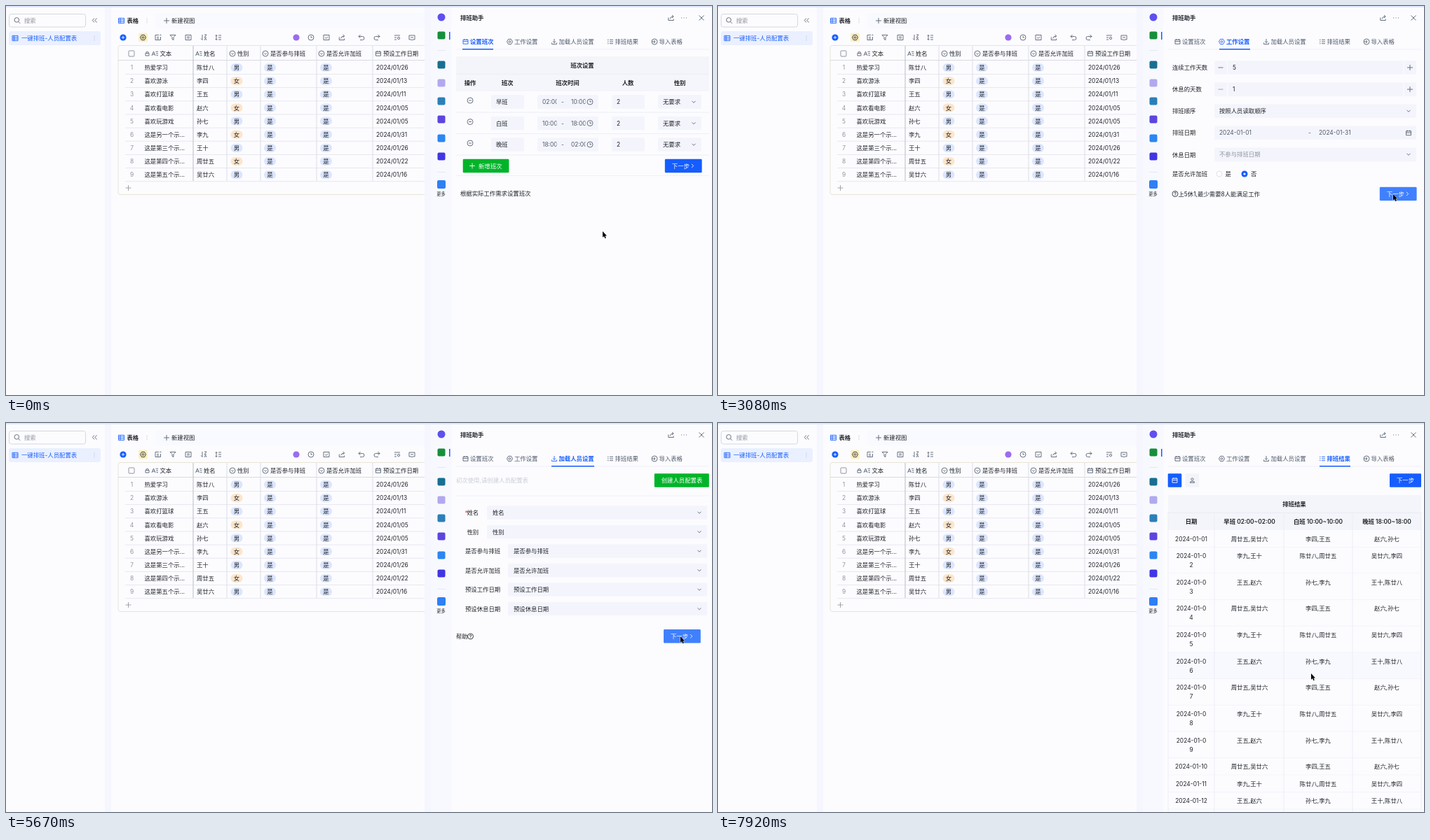
Recreate the animation shown at these times as an HTML page. Size 1007 px wide and 556 px high, loop 8 s.

```html
<!DOCTYPE html>
<html lang="zh-CN">
<head>
<meta charset="utf-8">
<title>排班助手</title>
<style>
html, body { margin: 0; width: 100%; height: 100%; overflow: hidden; background: #f5f6fe; }
svg { display: block; }
text { font: 8.4px Inter, "Noto Sans CJK SC", "Noto Sans CJK", sans-serif; fill: currentColor; white-space: pre; }
.b { font-weight: 600; }
.m { text-anchor: middle; }
.i { fill: none; stroke: currentColor; stroke-width: .85; }
#stage { color: #1f2329; }
#stage .w { color: #fff; }
.g { color: #4e5969; }
.l { color: #8f959e; }
.k { color: #165dff; }

/* one percent of the loop is 80 ms */
.page, .tab, .btn, .anim { animation: 8s step-end infinite; }
.page1 { animation-name: page1; }
.page2 { animation-name: page2; }
.page3 { animation-name: page3; }
.page4 { animation-name: page4; }
@keyframes page1 { 0% { visibility: visible } 17.7%, 100% { visibility: hidden } }
@keyframes page2 { 0% { visibility: hidden } 17.7% { visibility: visible } 49.95%, 100% { visibility: hidden } }
@keyframes page3 { 0% { visibility: hidden } 49.95% { visibility: visible } 83.3%, 100% { visibility: hidden } }
@keyframes page4 { 0% { visibility: hidden } 83.3%, 100% { visibility: visible } }

.tab { color: #4e5969; }
.tab1 { animation-name: tab1; }
.tab2 { animation-name: tab2; }
.tab3 { animation-name: tab3; }
.tab4 { animation-name: tab4; }
.tab text { font-weight: inherit; }
@keyframes tab1 { 0% { color: #165dff; font-weight: 600 } 17.7% { color: #165dff; font-weight: 400 } 18.7%, 100% { color: #4e5969; font-weight: 400 } }
@keyframes tab2 { 0% { color: #4e5969; font-weight: 400 } 17.7% { color: #1f2329; font-weight: 600 } 18.7% { color: #165dff; font-weight: 600 }
  49.95% { color: #165dff; font-weight: 400 } 50.95%, 100% { color: #4e5969; font-weight: 400 } }
@keyframes tab3 { 0% { color: #4e5969; font-weight: 400 } 49.95% { color: #1f2329; font-weight: 600 } 50.95% { color: #165dff; font-weight: 600 }
  83.3% { color: #165dff; font-weight: 400 } 84.3%, 100% { color: #4e5969; font-weight: 400 } }
@keyframes tab4 { 0% { color: #4e5969; font-weight: 400 } 83.3% { color: #1f2329; font-weight: 600 } 84.3%, 100% { color: #165dff; font-weight: 600 } }

.bar { animation-name: bar; }
@keyframes bar {
  0% { x: 651px; width: 44px } 17.7% { x: 678px; width: 44px } 18.7% { x: 710px; width: 44px } 19.7% { x: 715px; width: 44px }
  49.95% { x: 741px; width: 52px } 50.95% { x: 774px; width: 60px } 52.05% { x: 778px; width: 61px }
  83.3% { x: 812px; width: 54px } 84.3% { x: 852px; width: 46px } 85.3%, 100% { x: 858px; width: 44px }
}

.btn1 { animation-name: btn1; }
.btn2 { animation-name: btn2; }
.btn3 { animation-name: btn3; }
@keyframes btn1 { 0% { fill: #165dff } 12.45% { fill: #4080ff } 15.55%, 100% { fill: #0e42d2 } }
@keyframes btn2 { 0% { fill: #165dff } 30.2% { fill: #4080ff } 47.8%, 100% { fill: #0e42d2 } }
@keyframes btn3 { 0% { fill: #165dff } 60.3% { fill: #4080ff } 68.7% { fill: #0e42d2 } 70.8% { fill: #4080ff } 72.8%, 100% { fill: #165dff } }

.fade { animation-name: fade; }
.drop { animation-name: drop; }
.busy { animation-name: busy; }
.hot { animation-name: hot; }
.clear { animation-name: clear; }
.open { animation-name: open; }
.row5 { animation-name: row5; }
.row6 { animation-name: row6; }
@keyframes fade { 0% { opacity: 1 } 72.8%, 100% { opacity: .42 } }
@keyframes drop { 0% { transform: none } 72.8%, 100% { transform: translateY(13px) } }
@keyframes busy { 0% { opacity: 0 } 72.8%, 100% { opacity: 1 } }
@keyframes hot { 0% { fill: #eff0f8 } 58.3%, 100% { fill: #f4f5fc } }
@keyframes clear { 0% { opacity: 1 } 58.3%, 100% { opacity: 0 } }
@keyframes open { 0% { opacity: 0 } 58.3%, 100% { opacity: 1 } }
@keyframes row5 { 0% { fill: #fcfcff } 87.4% { fill: #f8f9fe } 96.8%, 100% { fill: #fcfcff } }
@keyframes row6 { 0% { fill: #fcfcff } 96.8%, 100% { fill: #f8f9fe } }

.spin { animation: spin 1s steps(12) infinite; }
@keyframes spin { from { transform: rotate(120deg) } to { transform: rotate(480deg) } }

.cursor { animation-name: cursor; }
@keyframes cursor {
  0% { transform: translate(851px, 322px) }
  3.1% { transform: translate(849px, 322px) }
  6.2% { transform: translate(849px, 322px); animation-timing-function: steps(4, start) }
  10.4% { transform: translate(1001px, 216px) }
  11.45% { transform: translate(1001px, 216px); animation-timing-function: steps(4, start) }
  15.6% { transform: translate(962px, 227px) }
  23.95% { transform: translate(962px, 227px); animation-timing-function: steps(3, start) }
  27.05% { transform: translate(907px, 240px); animation-timing-function: steps(1, start) }
  28.1% { transform: translate(904px, 243px); animation-timing-function: steps(4, start) }
  32.2% { transform: translate(962px, 270px) }
  37.45% { transform: translate(963px, 270px) }
  38.45% { transform: translate(963px, 269px) }
  56.2% { transform: translate(963px, 269px); animation-timing-function: steps(6, start) }
  62.5% { transform: translate(946px, 302px); animation-timing-function: steps(4, start) }
  66.6% { transform: translate(958px, 303px); animation-timing-function: steps(3, start) }
  69.7% { transform: translate(962px, 305px) }
  72.85% { transform: translate(962px, 305px); animation-timing-function: steps(8, start) }
  81.2% { transform: translate(904px, 296px); animation-timing-function: steps(11, start) }
  92.6% { transform: translate(850px, 318px) }
  96.8% { transform: translate(850px, 318px); animation-timing-function: steps(3, start) }
  99.95%, 100% { transform: translate(846px, 358px) }
}
</style>
</head>
<body>
<svg id="stage" width="1007" height="556" viewBox="0 0 1007 556"></svg>
<script>
const BLUE = '#165dff', GREEN = '#00b42a', FIELD = '#f4f5fc', LINE = '#e6e8f0', PANEL = '#fcfcff';
const CONTROL = 19.6;
const CIRCLE = 'M-4 0a4 4 0 1 0 8 0a4 4 0 1 0-8 0';
const ICON = {
  plus: 'M-4 0H4M0-4V4', minus: 'M-3.5 0H3.5', cross: 'M-3.5-3.5 3.5 3.5M3.5-3.5-3.5 3.5',
  smallCross: 'M-2-2 2 2M2-2-2 2', down: 'M-2.5-1.2 0 1.3 2.5-1.2', right: 'M-1.3-2.6 1.3 0-1.3 2.6',
  remove: CIRCLE + 'M-2 0H2', clock: CIRCLE + 'M0-2.2V0H2', select: CIRCLE + 'M-1.8-.7 0 1.2 1.8-.7',
  help: CIRCLE + 'M-1.3-1Q-1-2.3 0-2.3 1.4-2.2 1.3-1 1 0 0 .2V1M0 1.8V2.5', into: CIRCLE + 'M-4 0H1M-1-2 1 0-1 2',
  gear: 'M-2-3.6H2L4 0 2 3.6H-2L-4 0ZM-1.4 0a1.4 1.4 0 1 0 2.8 0a1.4 1.4 0 1 0-2.8 0',
  calendar: 'M-3.5-2.8H3.5V3.2H-3.5ZM-3.5-.4H3.5M-1.7-4V-2M1.7-4V-2', load: 'M0-4V1.5M-2-.5 0 1.5 2-.5M-3.5 1.5V3.5H3.5V1.5',
  list: 'M-4-2.7H-2.5M-4 0H-2.5M-4 2.7H-2.5M-1-2.7H4M-1 0H4M-1 2.7H4', grid: 'M-4-3.6H4V3.6H-4ZM-4-1.2H4M-4 1.2H4M-1.5-3.6V3.6',
  share: 'M-3.7-.5V3.5H3.7V1.5M-1.5 1.5Q-1-2 3.5-2M1.5-4 3.7-2 1.5 0', dots: 'M-4 0H-3M-.5 0H.5M3 0H4', more: 'M0-3.2V-2.4M0-.4V.4M0 2.4V3.2',
  search: 'M-4-.6a3.3 3.3 0 1 0 6.6 0a3.3 3.3 0 1 0-6.6 0M1.7 1.9 4.2 4.4', fold: 'M-.5-3-3.2 0-.5 3M3-3 .3 0 3 3',
  lock: 'M-2.5-.5H2.5V3H-2.5ZM-1.5-.5V-2Q0-4 1.5-2V-.5', alpha: 'M-4.5 3-2-3 .5 3M-3.7 1H-.3M1-2.7H4.5M1.5 0H4.5M2 2.7H4.5',
  person: 'M-1.6-1.6a1.6 1.6 0 1 0 3.2 0a1.6 1.6 0 1 0-3.2 0M-3 3.3V2Q0 .5 3 2V3.3Z',
  form: 'M3.5-1V3.5H-4V-3.5H1M-2-.5H1M-2 1.7H1M2.3-3.5H4.5', filter: 'M-4-3.5H4L1-.3V3.5L-1 2.5V-.3Z',
  box: 'M-4-3.5H4V3.5H-4ZM-2-1H2M-2 1H2', sort: 'M-2-4V3.5L-4 1.5M1-4H4L1 0H4M1 4 2.5 1 4 4',
  height: 'M-3-3.5V3.5M-4.3-2-3-3.5-1.7-2M-4.3 2-3 3.5-1.7 2M0-3H4M0 0H4M0 3H4',
  undo: 'M-1.5-4-4-1.5-1.5 1M-4-1.5H1.5Q4-1.5 4 1 4 3.5 1.5 3.5H-2', redo: 'M1.5-4 4-1.5 1.5 1M4-1.5H-1.5Q-4-1.5-4 1-4 3.5-1.5 3.5H2',
  find: 'M-4-3H4M-4 0H-1M-4 3H-1M.5 1a1.6 1.6 0 1 0 3.2 0a1.6 1.6 0 1 0-3.2 0', check: 'M-4-3.5H4V3.5H-4ZM-2 0-.5 1.5 2-1.2',
  note: 'M-4-3H4V3H1L0 4-1 3H-4ZM-2 0H2'
};

const text = (x, y, s, cls = '') => `<text x="${x}" y="${y + 3.1}" class="${cls}">${s}</text>`;
const rect = (x, y, w, h, fill, r = 0, extra = '') =>
  `<rect x="${x}" y="${y}" width="${w}" height="${h}" fill="${fill}" rx="${r}" ${extra}/>`;
const icon = (x, y, name, cls = '') => `<path d="${ICON[name]}" transform="translate(${x} ${y})" class="i ${cls}"/>`;
const disc = (x, y, r, fill) => `<circle cx="${x}" cy="${y}" r="${r}" fill="${fill}"/>`;
const hline = (x, y, w, c = LINE) => rect(x, y, w, 1, c);
const vline = (x, y, h, c = LINE) => rect(x, y, 1, h, c);
const group = (cls, s) => `<g class="${cls}">${s}</g>`;
const map = (list, fn) => list.map(fn).join('');
const control = (x, y, w, fill, extra = '') => rect(x, y - CONTROL / 2, w, CONTROL, fill, 1.4, extra);
const nextButton = (x, y, cls) =>
  control(x, y, 52.8, BLUE, `class="btn ${cls}"`) + text(x + 10, y, '下一步', 'w') + icon(x + 39.5, y, 'right', 'w');

function sidebar() {
  return rect(0, 2, 141, 554, PANEL) + rect(4.5, 11.5, 109, 18.5, PANEL, 3, 'stroke="#d5d8e2"') +
    icon(16, 20.5, 'search', 'g') + text(26, 21, '搜索', 'l') + icon(126.5, 20.5, 'fold', 'g') +
    rect(4, 36, 131, 20, '#eaf0ff', 3) + icon(13, 46, 'grid', 'k') + text(22, 46, '一键排班-人员配置表', 'k') + icon(126, 46, 'more', 'l');
}

function table() {
  const people = ['陈廿八', '李四', '王五', '赵六', '孙七', '李九', '王十', '周廿五', '吴廿六'];
  const notes = ['热爱学习', '喜欢游泳', '喜欢打篮球', '喜欢看电影', '喜欢玩游戏', '这是另一个示...', '这是第三个示...', '这是第四个示...', '这是第五个示...'];
  const days = [26, 13, 11, '05', '05', 31, 26, 22, 16];
  const women = [1, 3, 5, 7];
  const tools = [[217, 'form'], [238, 'filter'], [260, 'box'], [282, 'sort'], [303, 'height'], [435, 'clock'], [457, 'check'],
    [479, 'share'], [507, 'undo'], [529, 'redo'], [558, 'find'], [579, 'note']];
  const heads = [[370, '是否参与排班'], [450, '是否允许加班'], [323, '性别']];
  const pill = (x, y, s, fill) => rect(x - 8.5, y - 6, 17, 12, fill, 6) + text(x, y, s, 'm');
  const row = (name, i) => {
    const y = 88 + i * 19.15;
    return text(179.5, y, i + 1, 'm l') + text(197.5, y, notes[i]) + text(272, y, name) +
      (women.includes(i) ? pill(329, y, '女', '#fde5cb') : pill(329, y, '男', '#dce6fd')) +
      pill(376.5, y, '是', '#dce6fd') + pill(456.5, y, '是', '#dce6fd') +
      text(528, y, '2024/01/' + days[i]) + hline(170, y + 9, 427);
  };
  return rect(150, 2, 447, 554, PANEL) + rect(213, 10, 384, 22, '#f9faff') +
    icon(164.5, 21, 'grid', 'k') + text(172.5, 21, '表格', 'b') + icon(201, 21, 'more', 'l') +
    icon(229, 21, 'plus', 'g') + text(236, 21, '新建视图') +
    disc(167, 45, 4.6, BLUE) + '<path d="M164.8 45h4.4M167 42.8v4.4" class="i w"/>' +
    rect(189, 38.5, 13, 13, '#fdf0c4', 2) + icon(195.5, 45, 'gear') + disc(414, 45, 4.6, '#9b6cf0') +
    map(tools, ([x, name]) => icon(x, 45, name, 'g')) +
    '<path d="M597 56.5H163q-3 0-3 3V266q0 3.5 3 3.5H597" fill="none" stroke="#e8e5d6"/>' +
    hline(160, 77, 437, '#d9dbe2') + rect(175, 64, 8, 8, 'none', 1, 'stroke="#8f959e"') +
    icon(201.5, 68, 'lock', 'g') + icon(212.5, 68, 'alpha', 'g') + text(219.5, 68, '文本') +
    icon(275, 68, 'alpha', 'g') + text(282, 68, '姓名') +
    map(heads, ([x, s]) => icon(x, 68, 'select', 'g') + text(x + 7, 68, s)) +
    icon(531, 68, 'calendar', 'g') + text(538, 68, '预设工作日期') + map(people, row) +
    vline(266.5, 57, 193, '#b9bcc6') + map([315, 363, 443, 523], x => vline(x - .5, 57, 193, '#dcdee6')) + icon(174.5, 260, 'plus', 'l');
}

function dock() {
  const squares = [[42, '#168f3c'], [84, '#186f92'], [110, '#b1a9ef'], [136, '#2b7fb8'], [162, '#5b45e0'], [189, '#2b86f3'], [215, '#4036e4']];
  return rect(606, 2, 29, 554, '#f8f9ff') + disc(621, 16, 5.5, '#5f4ff0') +
    map(squares, ([y, c]) => rect(615.5, y - 5.5, 11, 11, c, 2)) + rect(615, 249, 12, 12, '#2f7ff5', 2) +
    hline(615, 63, 12) + hline(615, 237, 12) + rect(632, 37, 1.5, 11, BLUE) +
    '<text x="620.5" y="271" class="m" style="font-size:6.3px">更多</text>';
}

function panelHead() {
  const tabs = [[655.5, 'calendar', '设置班次'], [718.5, 'gear', '工作设置'], [782, 'load', '加载人员设置'], [862, 'list', '排班结果'], [925, 'into', '导入表格']];
  return rect(635, 2, 372, 554, PANEL) + text(648, 17, '排班助手', 'b') +
    icon(948.5, 17, 'share', 'g') + icon(967, 17, 'dots', 'g') + icon(992, 17, 'cross', 'g') + hline(642, 61.5, 361, '#f1f2f8') +
    map(tabs, ([x, name, s], i) => group(`tab tab${i + 1}`, icon(x, 51, name) + text(x + 6.5, 51, s))) +
    rect(651, 61, 44, 1.5, BLUE, 0, 'class="anim bar"');
}

function shiftPage() {
  const heads = [[662, '操作'], [715, '班次'], [801, '班次时间'], [887, '人数'], [961, '性别']];
  const shifts = [['早班', '02:00', '10:00'], ['白班', '10:00', '18:00'], ['晚班', '18:00', '02:00']];
  const time = (x, y, s) => `<svg x="${x}" y="${y - 10}" width="20.5" height="20">${text(0, 10, s, 'g')}</svg>`;
  const row = ([name, from, to], i) => {
    const y = 137 + i * 30.5;
    return icon(662, y - 2, 'remove', 'g') + control(692, y, 47, FIELD) + text(699, y, name) +
      control(758, y, 87, FIELD) + time(765, y, from) + text(792, y, '-', 'g') + time(806, y, to) + icon(833, y, 'clock', 'g') +
      control(864, y, 47, FIELD) + text(871, y, '2') + control(930, y, 62, FIELD) +
      text(937, y, '无要求') + icon(981, y, 'down', 'g') + hline(642, y + 14.5, 361, '#eeeff6');
  };
  return rect(642, 72, 361, 25, '#f4f5fb') + hline(642, 97, 361, '#ecedf4') + rect(642, 98, 361, 24, '#f5f6fb') +
    text(822, 85, '班次设置', 'b m') + map(heads, ([x, s]) => text(x, 110, s, 'b m')) + map(shifts, row) +
    hline(642, 242, 361, '#eeeff6') + control(651.7, 228.5, 65.7, GREEN) + icon(665, 228.5, 'plus', 'w') +
    text(674, 228.5, '新增班次', 'w') + nextButton(939.8, 228.5, 'btn1') + text(648, 268, '根据实际工作需求设置班次');
}

function workPage() {
  const labels = ['连续工作天数', '休息的天数', '排班顺序', '排班日期', '休息日期'];
  const stepper = (y, value, cls) => icon(717, y, 'minus', cls) + text(734, y, value) + icon(987, y, 'plus', 'g') +
    vline(726, y - 10, 20, PANEL) + vline(977.5, y - 10, 20, PANEL);
  return map(labels, (s, i) => text(648, 88 + i * 31.1, s) + control(708, 88 + i * 31.1, 288, FIELD)) +
    stepper(88, '5', 'g') + stepper(119.1, '1', 'l') +
    text(715, 150, '按照人员读取顺序') + icon(985, 150, 'down', 'g') +
    text(715, 181, '2024-01-01', 'g') + text(842, 181, '-', 'g') + text(857, 181, '2024-01-31', 'g') + icon(985, 181.5, 'calendar', 'g') +
    text(715, 212, '不参与排班日期', 'l') + icon(985, 212, 'down', 'g') +
    text(648, 240, '是否允许加班') + '<circle cx="715" cy="240" r="4" fill="#fff" stroke="#dfe1e8"/>' + text(723.5, 240, '是') +
    disc(751, 240, 4.5, BLUE) + disc(751, 240, 1.6, '#fff') + text(760, 240, '否') +
    icon(652, 268.5, 'help') + text(656.5, 268.5, '上5休1,最少需要8人能满足工作') + nextButton(943.8, 268.5, 'btn2');
}

function staffPage() {
  const fields = ['姓名', '性别', '是否参与排班', '是否允许加班', '预设工作日期', '预设休息日期'];
  const field = (s, i) => {
    const y = 128 + i * 27.5, x = i < 2 ? 686 : 716, last = i === 5;
    return text(i < 2 ? 657.5 : 655, y, s) + control(x, y, 1000 - x, FIELD, last ? 'class="anim hot"' : '') +
      text(x + 8, y, s) + icon(989, y, 'down', last ? 'g anim open' : 'g') + (last ? icon(989, y, 'smallCross', 'g anim clear') : '');
  };
  const form = `<g style="color:#c9cdd4">${text(642, 82, '初次使用,请创建人员配置表')}</g>` +
    control(924.8, 82, 78, GREEN) + text(964, 82, '创建人员配置表', 'w m') + hline(642, 103.5, 361, '#f0f1f6') +
    `<g style="color:#f53f3f">${text(654.5, 128.5, '*')}</g>` + map(fields, field) +
    group('anim drop', text(642, 305, '帮助') + icon(662.5, 305, 'help') + nextButton(938, 304.8, 'btn3'));
  const loading = rect(642, 285, 331, 2, '#f0f1f6', 1) + '<g style="color:#b5b9c2"><text x="990.5" y="288.8" style="font-size:7.3px">0%</text></g>' +
    `<g transform="translate(822.5 200)"><path class="spin" d="M4.6 0A4.6 4.6 0 1 1 0-4.6" fill="none" stroke="${BLUE}" stroke-width="1.2"/></g>`;
  return group('anim fade', form) + group('anim busy', loading);
}

function resultPage() {
  const rota = ['周廿五', '吴廿六', '李四', '王五', '赵六', '孙七', '李九', '王十', '陈廿八'];
  const centres = [758, 856, 954];
  const heads = ['早班 02:00~02:00', '白班 10:00~10:00', '晚班 18:00~18:00'];
  const wraps = day => day > 1 && day < 10;
  let rows = '', top = 153;
  for (let day = 1; day <= 13; day++) {
    const height = wraps(day) ? 37.65 : 24.5, y = top + 12.5;
    const date = '2024-01-' + String(day).padStart(2, '0');
    rows += rect(642, top, 361, height, PANEL, 0, `class="anim row${day}"`) + hline(642, top + height - .5, 361, '#ecedf5') +
      (wraps(day) ? text(675, y, date.slice(0, 9), 'm') + text(675, y + 13, day, 'm') : text(675, y, date, 'm'));
    centres.forEach((x, k) => {
      const first = (day - 1) * 6 + k * 2;
      rows += text(x, y, rota[first % 9] + ',' + rota[(first + 1) % 9], 'm');
    });
    top += height;
  }
  return control(641.7, 82, CONTROL, BLUE) + icon(651.5, 82, 'calendar', 'w') + control(666.7, 82, CONTROL, '#f3f4fa') + icon(676.5, 82, 'person', 'g') +
    control(958, 82, 45, BLUE) + text(980.5, 82, '下一步', 'w m') +
    rect(642, 103, 361, 50, '#f4f5fb') + hline(642, 128, 361, '#e9ebf3') + text(822, 116, '排班结果', 'b m') + text(675, 141, '日期', 'b m') +
    map(heads, (s, i) => text(centres[i], 141, s, 'b m')) + rows +
    map([642, 708, 807, 905, 1003], x => vline(x - .5, 128, 428, '#ecedf5'));
}

const pages = [shiftPage, workPage, staffPage, resultPage];
document.getElementById('stage').innerHTML = rect(0, 0, 1007, 556, '#f5f6fe') + rect(0, 0, 1007, 2, '#dfe7fd') +
  sidebar() + table() + dock() + panelHead() + map(pages, (page, i) => group(`page page${i + 1}`, page())) +
  '<path class="anim cursor" d="M0 0V8.8L2 7 3.4 10.2 4.8 9.6 3.5 6.6H6Z" fill="#000" stroke="#fff" stroke-width=".8" paint-order="stroke"/>';
</script>
</body>
</html>
```
